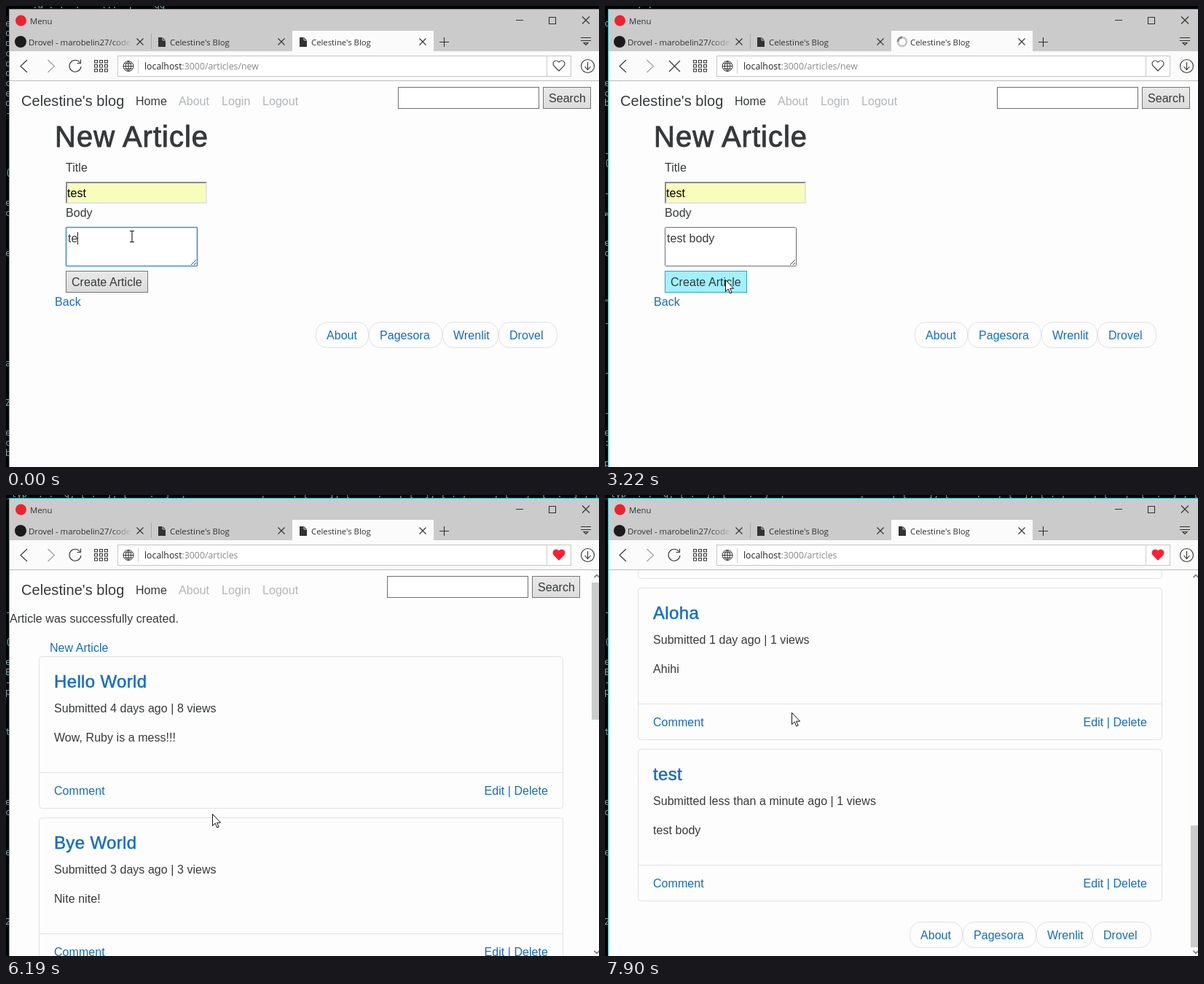
These frames come from a looping animation (814 by 632 pixels, 8 s). An HTML page:

```html
<!DOCTYPE html>
<html lang="en">
<head>
<meta charset="utf-8">
<title>Blog demo</title>
<style>
html, body { margin: 0; height: 100%; overflow: hidden; background: #000; }
svg { display: block; width: 814px; height: 632px; }
text { font: 16px "Liberation Sans", sans-serif; fill: #36393b; letter-spacing: .05px; white-space: pre; }
.link { fill: #146cc7; }
.dim { fill: #b1b5b9; }
.brand { font-size: 20px; }
.h1 { font-size: 40px; letter-spacing: 1px; stroke: #333638; stroke-width: .9px; }
.h4 { font-size: 24px; letter-spacing: .35px; stroke: #333638; stroke-width: .5px; }
.h4.link { stroke: #146cc7; }
.ui { font: 11.4px "Open Sans", sans-serif; fill: #333; letter-spacing: -.04px; }
.url { font: 12.3px "Open Sans", sans-serif; fill: #222; letter-spacing: 0; }
.url tspan { fill: #888; }
.term { font: 12px "DejaVu Sans Mono", monospace; fill: #8aa2a9; }
.line { fill: none; stroke: #333; stroke-width: 1.1px; }
.card { fill: none; stroke: #e2e2e2; }
.field { fill: #fff; stroke: #6f6f6f; }
.button { fill: url(#face); stroke: #757575; }
.hot { fill: #a1f1ff; stroke: #2aa0cf; }
.focus { stroke: #3f8fe0; stroke-width: 1.6px; }
</style>
</head>
<body>
<svg id="stage" viewBox="0 0 814 632"></svg>
<script>
const LOOP = 8000, MAX_SCROLL = 1055;

const TICKS = [0, 300, 730, 1010, 1180, 1340, 1510, 1680,
  2230, 2370, 2510, 2650, 2810, 2950, 3090, 3220, 3370,
  3760, 3894, 4028, 4163, 4297, 4431, 4566, 4700,
  4830, 4960, 5080, 5200, 5350, 5510,
  5800, 5930, 6060, 6190, 6340, 6470,
  6780, 6920, 7060, 7200, 7350, 7500, 7630, 7750, 7900];
const TYPED = [300, 730, 1010, 1180, 1340, 1510, 1680];
const POINTER = [[0, 173, 316], [1680, 173, 316], [2650, 172, 354], [2950, 166, 374],
  [3220, 165, 375], [3370, 165, 405], [3760, 190, 410], [4431, 488, 457], [4700, 457, 460],
  [5080, 123, 415], [5510, 85, 411], [5800, 88, 412], [6190, 283, 437], [6470, 258, 300],
  [7350, 257, 295], [7750, 256, 300], [7900, 256, 298]];
const SCROLL = [[6700, 0], [7350, 796], [7630, MAX_SCROLL]];

const text = (x, y, s, cls = '', extra = '') => `<text x="${x}" y="${y}" class="${cls}" ${extra}>${s}</text>`;
const rect = (x, y, w, h, attrs) => `<rect x="${x}" y="${y}" width="${w}" height="${h}" ${attrs}/>`;
const box = (x, y, w, h, cls, attrs = '') => rect(x + .5, y + .5, w - 1, h - 1, `class="${cls}" ${attrs}`);
const path = (d, attrs = '') => `<path d="${d}" class="line" ${attrs}/>`;
const cross = (x, y, r) => path(`M${x - r} ${y - r}l${2 * r} ${2 * r}m0 ${-2 * r}l${-2 * r} ${2 * r}`);
const fileIcon = x => `<path d="M${x} 43h6l4 4v9h-10z" fill="#333"/><path d="M${x + 6} 43v4h4" stroke="#ccc" fill="none"/>`;

function terminal(id, top, column) {
  const chars = column.split(' ').map(c => text(-1, 14 + 13.7 * parseInt(c), c.slice(-1), 'term'));
  return `<g id="${id}">${text(0, 2.5, top, 'term')}${chars.join('')}</g>`;
}

function header(shift) {
  return text(21, 137, "Celestine's blog", 'brand') + text(178, 136, 'Home') +
    text(237, 136, 'About', 'dim') + text(296, 136, 'Login', 'dim') + text(352, 136, 'Logout', 'dim') +
    box(538 - shift, 111, 194, 30, 'field') + box(737 - shift, 111, 66, 30, 'button') +
    text(745 - shift, 132, 'Search');
}

function footer(x, y) {
  const pills = [['About', 0, 73], ['Pagesora', 73, 101], ['Wrenlit', 174, 77], ['Drovel', 251, 81]];
  return pills.map(([s, dx, w]) =>
    box(x + dx, y, w, 36, 'card', 'rx="15"') + text(x + dx + 15, y + 24, s, 'link')).join('');
}

const card = (x, y, w, h, title, meta, body, titleClass = 'h4 link') =>
  box(x, y, w, h, 'card', 'rx="4"') + text(x + 21, y + 43, title, titleClass) +
  text(x + 21, y + 77, 'Submitted ' + meta) + text(x + 21, y + 117, body) +
  `<path d="M${x} ${y + h - 49.5}h${w}" class="card"/>`;

const post = (y, h, title, meta, body) => card(45, y, 720, h, title, meta, body) +
  text(66, y + h - 19, 'Comment', 'link') + text(744, y + h - 19, 'Edit | Delete', 'link', 'text-anchor="end"');

function forest(x, y, w, h) {
  let seed = 7;
  const rnd = () => (seed = seed * 16807 % 2147483647) / 2147483647;
  const leaves = (n, cx, cy, rx, ry, fill) => Array.from({ length: n }, () => {
    const a = rnd() * 6.28, r = rnd() ** .7;
    return `<ellipse cx="${cx + rx * r * Math.cos(a)}" cy="${cy + ry * r * Math.sin(a)}" rx="${1 + 2.5 * rnd()}" ry="${.6 + rnd()}" fill="${fill}" opacity="${.4 + .5 * rnd()}"/>`;
  }).join('');
  return `<svg x="${x}" y="${y}" width="${w}" height="${h}">` + rect(0, 0, w, h, 'fill="url(#wood)"') +
    leaves(220, 105, h - 110, 100, 110, '#31481f') + rect(0, 0, 38, h, 'fill="#1c160c"') +
    rect(131, 0, 22, h - 45, 'fill="#322d1f"') + leaves(130, 128, h - 130, 55, 48, '#56703c') +
    leaves(40, 145, h - 130, 36, 32, '#94a878') + leaves(130, 90, h - 42, 52, 24, '#4c7820') +
    leaves(70, 18, h - 15, 30, 18, '#38551b') + leaves(70, 160, h - 25, 40, 24, '#2a451a') + '</svg>';
}

const formPage = header(0) + text(67, 193, 'New Article', 'h1') +
  text(82, 227, 'Title') + rect(82, 241, 194, 30, 'fill="#e4e4e4"') + rect(84, 243, 190, 26, 'fill="#f8fdba"') +
  '<path d="M276 241h-194v30l2-2v-26h190z" fill="#8b8b8b"/>' + text(84, 262, 'test', '', 'style="fill:#000"') +
  text(82, 289, 'Body') + box(82, 303, 181, 54, 'field', 'id="area" rx="1"') +
  path('M254 355l7-7m-3 7l3-3', 'style="stroke-width:.9px"') + text(85, 324, '', '', 'id="typed"') +
  rect(0, 310, 1, 17, 'id="caret" fill="#222"') +
  box(82, 363, 113, 30, 'button', 'id="create"') + text(90, 384, 'Create Article') +
  text(67, 411, 'Back', 'link') + footer(425, 433);

const articlePage = header(0) +
  card(67, 181, 690, 209, 'test', 'less than a minute ago | 1 views', 'test body', 'h4') +
  text(88, 371, 'Edit | Delete', 'link') + text(67, 420, 'Back', 'link') + footer(425, 442);

const listPage = '<g id="scroller">' + header(15) + text(5, 175, 'Article was successfully created.') +
  text(60, 215, 'New Article', 'link') +
  post(221, 209, 'Hello World', '4 days ago | 8 views', 'Wow, Ruby is a mess!!!') +
  post(442, 209, 'Bye World', '3 days ago | 3 views', 'Nite nite!') +
  post(663, 507, 'Forest', '2 days ago | 2 views', '') + forest(66, 763, 200, 321) +
  post(1182, 209, 'Aloha', '1 day ago | 1 views', 'Ahihi') +
  post(1403, 209, 'test', 'less than a minute ago | 1 views', 'test body') +
  footer(418, 1640) + '</g>' + rect(803, 103, 11, 529, 'fill="#fcfcfc"') +
  rect(804, 120, 10, 188, 'id="thumb" fill="#cbcbcb"') +
  path('M807.500 113l3.500-3.500 3.500 3.500M807.500 625l3.500 3.500 3.500-3.500', 'style="stroke:#888;stroke-width:1.8px"');

const dial = Array.from({ length: 9 }, (_, i) =>
  rect(121.5 + i % 3 * 7, 74.5 + (i / 3 | 0) * 6, 4, 3.5, 'class="line" style="stroke-width:1px"')).join('');

const chrome = rect(5, 5, 809, 57, 'fill="#cbcbcb"') + rect(5, 62, 809, 40, 'fill="#fbfbfb"') +
  rect(5, 102, 809, 1, 'fill="#bdbdbd"') + rect(393, 34, 194, 28, 'fill="#fbfbfb"') +
  '<circle cx="20.500" cy="20" r="7.500" fill="#ec2230"/>' + text(33, 25, 'Menu', 'ui') +
  path('M700 19.500h10M745.500 15.500h9v9h-9z') + cross(796, 19.5, 5) +
  path('M789 43.500h14M789 47.500h14M793 50.500h6l-3 3z') +
  '<circle cx="20" cy="49" r="8" fill="#1d1a1b"/>' + text(31, 54, 'Drovel - marobelin27/code', 'ui') +
  rect(145, 40, 28, 20, 'fill="url(#fade)"') + cross(184, 49, 4.5) +
  rect(199, 38, 1, 21, 'fill="#a8a8a8"') + fileIcon(209) + text(225, 54, "Celestine's Blog", 'ui') + cross(378, 49, 4.5) +
  `<g id="tabIcon">${fileIcon(403)}</g>` +
  '<g id="spinner" fill="none" stroke-width="2.800"><circle cx="408" cy="49" r="6" stroke="#c9c9c9"/><path d="M402 49a6 6 0 0 1 6-6" stroke="#888"/></g>' +
  text(419, 54, "Celestine's Blog", 'ui') + cross(572, 49, 4.5) + path('M595 49.500h13M601.500 43v13') +
  path('M29 74l-9 8.500 9 8.500') + path('M57.500 74l9 8.500-9 8.500', 'style="stroke:#999"') +
  `<g id="reload">${path('M101.500 77.500a8 8 0 1 0 1.500 5.500M102.500 73.500v5h-5')}</g><g id="stop">${cross(95.5, 82.5, 7.5)}</g>` +
  dial + rect(153.5, 68.5, 622, 28, 'fill="#fff" stroke="#c6c6c6"') +
  rect(181, 73, 1, 20, 'fill="#ccc"') + rect(742, 69, 1, 28, 'fill="#ccc"') +
  path('M161 82.500h14M168 75.500v14M162.500 79h11M162.500 86h11M168 75.500a7 7 0 0 1 0 14a7 7 0 0 1 0-14c-5 4-5 10 0 14c5-4 5-10 0-14', 'style="stroke-width:1px"') +
  text(190, 87, 'localhost<tspan id="route"></tspan>', 'url') +
  path('M759 89l-6.500-6.500C748 77 755 72 759 77C763 72 770 77 765.500 82.500z', 'id="heart"') +
  '<circle cx="798.500" cy="82.500" r="9" class="line"/>' + path('M798.500 77v10m-4-4l4 4.500 4-4.500');

stage.innerHTML = `<defs>
  <linearGradient id="face" x2="0" y2="1"><stop stop-color="#e9e9e9"/><stop offset="1" stop-color="#dcdcdc"/></linearGradient>
  <linearGradient id="fade"><stop stop-color="#cbcbcb" stop-opacity="0"/><stop offset="1" stop-color="#cbcbcb"/></linearGradient>
  <linearGradient id="wood" x2="0" y2="1"><stop stop-color="#18200f"/><stop offset=".7" stop-color="#202d17"/><stop offset="1" stop-color="#16220e"/></linearGradient>
  <clipPath id="view">${rect(5, 103, 809, 529, '')}</clipPath>
</defs>` + rect(0, 0, 814, 632, 'fill="#000"') +
  terminal('term0', '    _.a_._.__.__  ::.__;   _gg_',
    '1e 2o 3o 4c 5o 6o 7c 8e 9o 10- 16( 19e 20c 218 24e 35a 39Z 42e 43c 44b') +
  terminal('term1', ' _  __._.__', '1c 52 7e 8c 9b 14- 15( 18- 20w 23e 24c 258 29" 31- 36- 40- 42e 43: 447 45p') +
  terminal('term2', '_typ__._.__g, [_.__], [____.__]  ,__ "__"__ "__", "__", ["__"], ["____.__", [__], [_._, "__", [__",  ["_.__] , [__]',
    '42 51 11- 14( 16e 17E 18- 19p 23t 270 30e 31c 328 35e') +
  rect(4, 4, 810, 628, 'fill="#19c9d2"') + rect(5, 5, 809, 627, 'fill="#fdfdfd"') +
  `<g clip-path="url(#view)"><g id="form">${formPage}</g><g id="article">${articlePage}</g><g id="list">${listPage}</g></g>` + chrome +
  `<g id="pointer"><g id="beam">${path('M-3-7.500h2.500l.5.500.500-.5H3M-3 7.500h2.500l.5-.5.500.500H3M0-7V7', 'style="stroke:#111"')}</g>
  <path id="arrow" d="M.5 .5v16l3.700-3.500 2.600 6 2.400-1-2.600-5.800h5z" fill="#fff" stroke="#111"/></g>`;

const el = id => document.getElementById(id);
const show = (id, on) => el(id).style.display = on ? '' : 'none';

// Linear interpolation through [time, ...values] keys.
function along(keys, t) {
  if (t <= keys[0][0]) return keys[0].slice(1);
  const i = keys.findIndex(k => k[0] > t);
  if (i < 0) return keys[keys.length - 1].slice(1);
  const a = keys[i - 1], b = keys[i], f = (t - a[0]) / (b[0] - a[0]);
  return a.slice(1).map((v, j) => v + (b[j + 1] - v) * f);
}

function draw(now) {
  const time = now % LOOP;
  const t = TICKS.filter(tick => tick <= time).pop();
  const page = t < 3370 ? 'form' : t < 5930 ? 'article' : 'list';
  const loading = t === 3220 || t === 5800;

  ['form', 'article', 'list'].forEach(id => show(id, id === page));
  show('term0', t < 3220);
  show('term1', t >= 3220 && t < 5930);
  show('term2', t >= 5930);
  show('spinner', loading);
  show('stop', loading);
  show('tabIcon', !loading);
  show('reload', !loading);
  el('route').textContent = ':3000/articles' + { form: '/new', article: '/7', list: '' }[page];
  el('heart').style.cssText = page === 'list' ? 'fill:#ff1f35;stroke:#ff1f35' : '';

  if (page === 'form') {
    el('typed').textContent = 'test body'.slice(0, 2 + TYPED.filter(k => k <= t).length);
    el('caret').setAttribute('x', Math.round(85 + el('typed').getComputedTextLength()));
    show('caret', t < 2230);
    el('area').classList.toggle('focus', t < 3090);
    el('create').classList.toggle('hot', t >= 2810);
  }

  const scroll = along(SCROLL, t)[0];
  el('scroller').setAttribute('transform', `translate(0 ${-Math.round(scroll)})`);
  el('thumb').setAttribute('y', 120 + 333 * scroll / MAX_SCROLL);
  el('thumb').setAttribute('height', t < 6780 ? 188 : 167);

  const [x, y] = along(POINTER, t).map(Math.round);
  el('pointer').setAttribute('transform', `translate(${x} ${y})`);
  show('beam', t < 2810);
  show('arrow', t >= 2810);
}

function loop() {
  draw(performance.now());
  requestAnimationFrame(loop);
}
loop();
</script>
</body>
</html>
```
